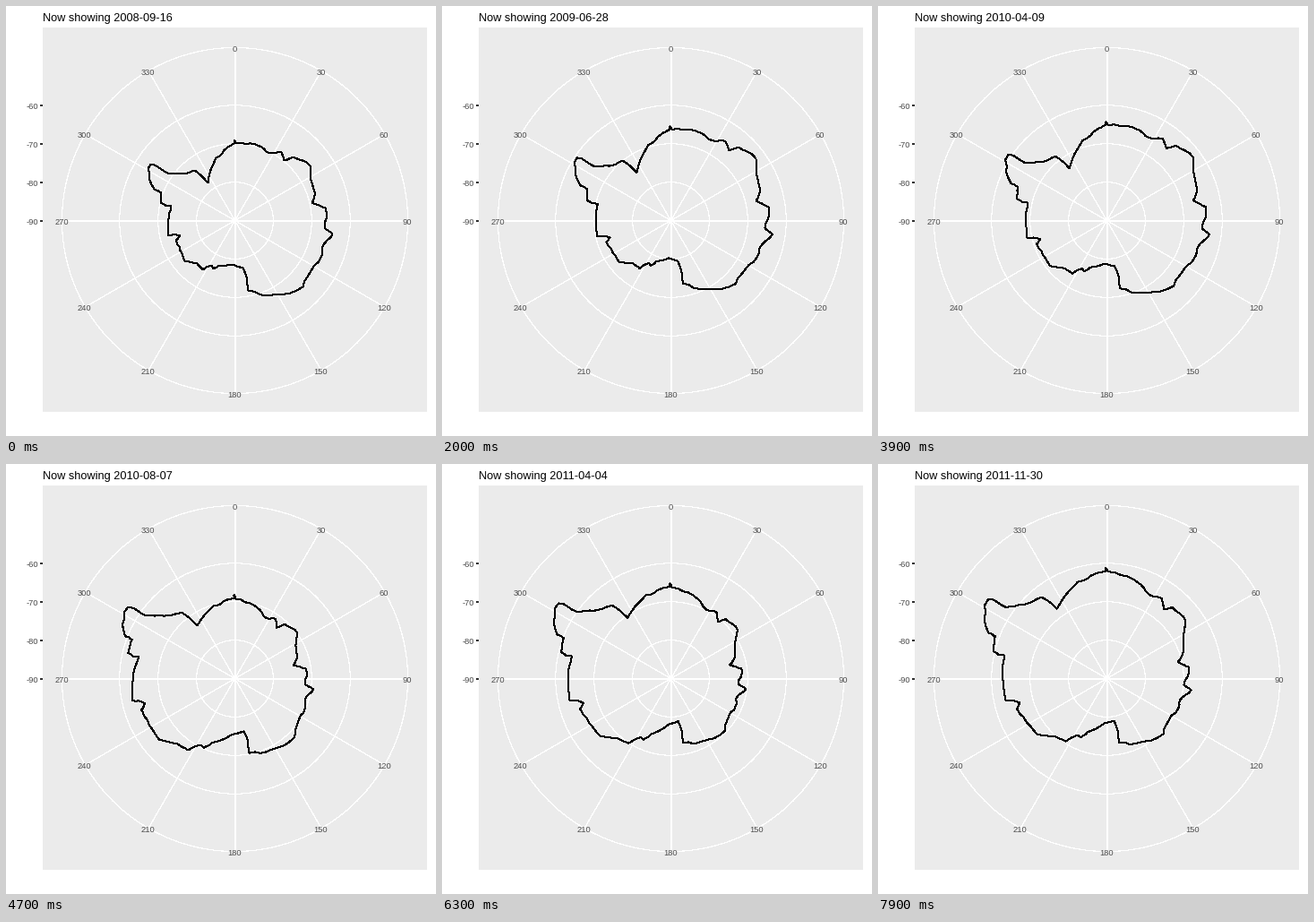
A matplotlib script that plays this animation: 480 px wide and 480 px high, repeating every 8 s.

```python
import numpy as np
import matplotlib.pyplot as plt
from matplotlib.animation import FuncAnimation
from matplotlib.patches import Circle, Rectangle

SIZE, FRAMES, STEP = 480, 80, 100
CX, CY = 255.5, 239.5
DEG = 4.29            # pixels per degree of latitude
RIM = 193

plt.rcParams["font.family"] = "Liberation Sans"

# Main capes and bays, clockwise from longitude 0
CAPES = np.array([
    (254, 149), (256, 153), (278, 154), (290, 162), (307, 163), (310, 172),
    (320, 168), (339, 178), (344, 207), (341, 219), (356, 225), (355, 247),
    (364, 254), (353, 268), (351, 280), (343, 290), (331, 313), (297, 322),
    (270, 317), (264, 292), (252, 288), (237, 289), (231, 293), (229, 289),
    (219, 294), (213, 287), (199, 284), (193, 268), (189, 261), (194, 256),
    (180, 255), (181, 237), (184, 223), (172, 219), (173, 208), (165, 204),
    (158, 181), (161, 176), (180, 186), (196, 187), (210, 183), (225, 197),
    (234, 169), (246, 158), (254, 153), (254, 150),
]) + 0.5

# Key poses: time, swell, tilt towards 0 and towards 90 degrees
T, SWELL, TILT_0, TILT_90 = np.array([
    (0, 0, 0, 0), (12, 2.8, -9.5, -27.6), (20, 6, 11.5, -1.7),
    (32, 11.3, -13.5, -18.2), (47, 8.2, -4.2, -30.9),
    (63, 8.2, 7.8, -32.3), (79, 15.6, 17.2, -27.4),
]).T
HUB = 1, -16                # centre of the circling tilt
TURN = np.radians(-19.9)    # mean turn per frame


def roughen(points, rng):
    """Split every edge and push its middle sideways a little."""
    edge = np.diff(points, axis=0)
    side = edge[:, ::-1] * (1, -1)
    mid = points[:-1] + edge / 2 + side * rng.uniform(-0.1, 0.1, (len(edge), 1))
    out = np.empty((len(points) + len(mid), 2))
    out[::2], out[1::2] = points, mid
    return out


def breath(t):
    return 8.5 * (1 - np.cos(2 * np.pi * t / 3.95))


rng = np.random.default_rng(4)
x, y = (roughen(roughen(CAPES, rng), rng) - (CX, CY)).T
coast_r, lon = np.hypot(x, y), np.arctan2(x, -y)

swell = SWELL - breath(T)
dx, dy = TILT_0 - HUB[0], TILT_90 - HUB[1]
radius, angle = np.hypot(dx, dy), np.arctan2(dy, dx)
angle += 2 * np.pi * np.round((angle[0] + TURN * T - angle) / (2 * np.pi))


def coast_at(t):
    s, r, a = (np.interp(t, T, v) for v in (swell, radius, angle))
    tilt_0, tilt_90 = HUB[0] + r * np.cos(a), HUB[1] + r * np.sin(a)
    oval = min(t / 12, 1) * ((0.045 * t - 2.8) * np.cos(2 * lon)
                             + 1.7 * np.sin(2 * lon))
    rr = (coast_r + s + breath(t) + oval
          + tilt_0 * np.cos(lon) + tilt_90 * np.sin(lon))
    return CX + rr * np.sin(lon), CY - rr * np.cos(lon)


def date_at(t):
    return np.datetime64("2008-09-16") + 15 * max(t - 1, 0)


def px(n):
    return n * 0.72


fig = plt.figure(figsize=(4.8, 4.8), dpi=100, facecolor="white")
ax = fig.add_axes([0, 0, 1, 1])
ax.set(xlim=(0, SIZE), ylim=(SIZE, 0))
ax.axis("off")

# Hard-edged strokes cover every pixel they touch, so widths are kept slim
hair = dict(lw=px(0.1), antialiased=False)
label = dict(color="#4D4D4D", fontsize=px(9.4), va="baseline")

ax.add_patch(Rectangle((41, 24), 429, 429, fc="#EBEBEB", lw=0))
for r in (10 * DEG, 20 * DEG, 30 * DEG, RIM):
    ax.add_patch(Circle((CX, CY), r, fill=False, ec="white", **hair))

for deg in range(0, 360, 30):
    u, v = np.sin(np.radians(deg)), -np.cos(np.radians(deg))
    ax.plot([CX, CX + RIM * u], [CY, CY + RIM * v], color="white", **hair)
    ax.text(CX - 0.5 + RIM * u, CY + 4.3 + RIM * v, deg, ha="center", **label)

for lat in (-60, -70, -80, -90):
    row = CY - (lat + 90) * DEG
    ax.plot([38, 41], [row, row], color="#333333", solid_capstyle="butt", **hair)
    ax.text(36.5, row + 4, lat, ha="right", **label)

title = ax.text(41, 17, "", color="black", fontsize=px(12.7), va="baseline")
line, = ax.plot([], [], color="black", lw=px(1), antialiased=False,
                solid_joinstyle="round", solid_capstyle="butt")


def draw(t):
    line.set_data(*coast_at(t))
    title.set_text(f"Now showing {date_at(t)}")
    return line, title


anim = FuncAnimation(fig, draw, frames=FRAMES, interval=STEP, repeat=True,
                     repeat_delay=0)
plt.show()
```
